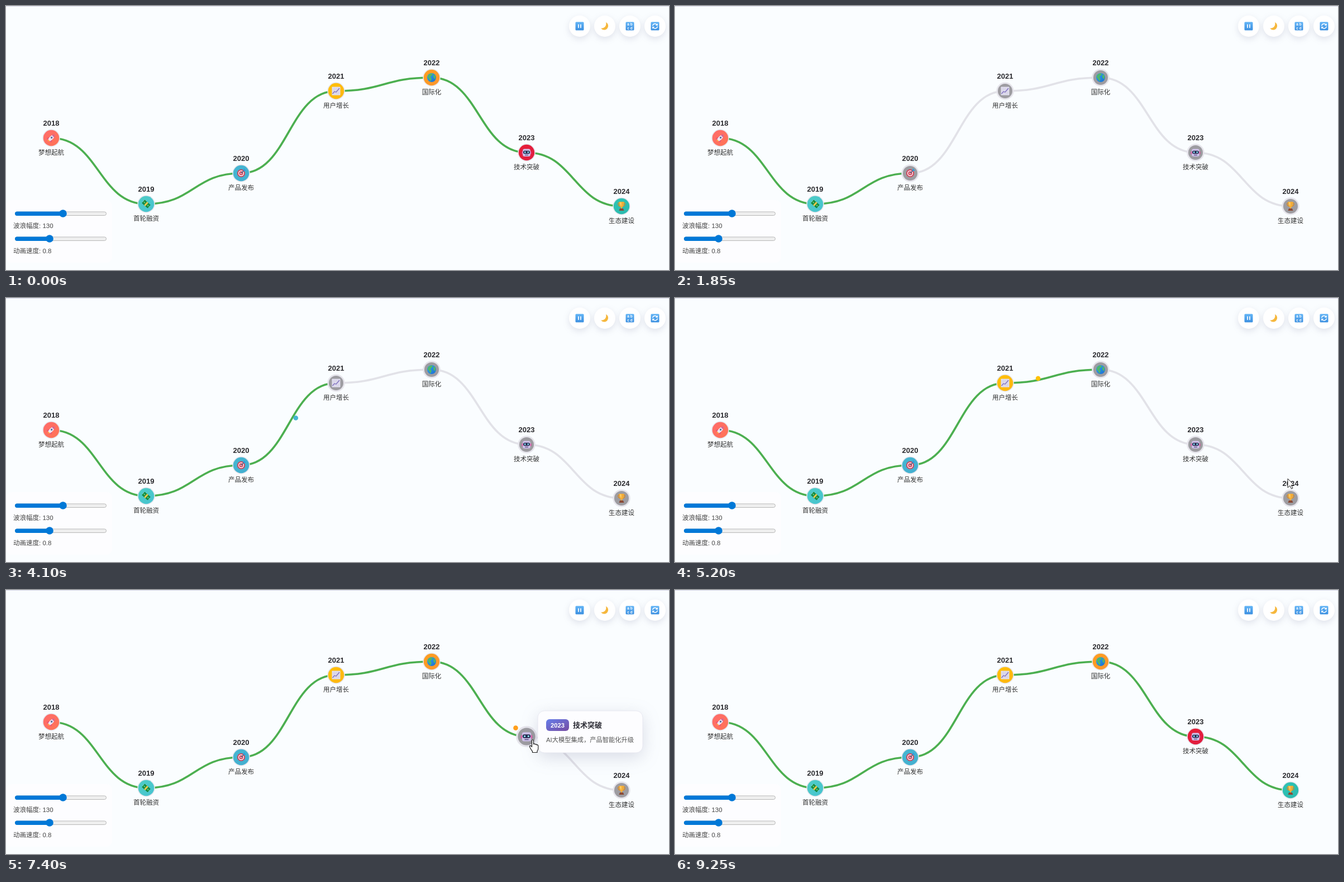
An HTML page for the animation above (9.8 s loop, 1187x472 px).

```html
<!DOCTYPE html>
<html lang="zh-CN">
<head>
<meta charset="utf-8">
<title>发展历程</title>
<style>
  html, body { margin: 0; width: 100%; height: 100%; overflow: hidden; background: #fafdff; }
  svg { display: block; width: 1187px; height: 472px;
    font-family: "Liberation Sans", "Noto Sans CJK SC", "Noto Sans CJK", sans-serif; }
  .year { font-size: 13px; font-weight: 700; fill: #2b2b2f; text-anchor: middle; }
  .name { font-size: 11.5px; font-weight: 500; fill: #333; text-anchor: middle; }
  .setting { font-size: 11.5px; font-weight: 500; fill: #444; }
  .title { font-size: 13px; font-weight: 700; fill: #2b2b33; }
  .detail { font-size: 11.25px; fill: #555; }
  .badge { font-size: 11.2px; font-weight: 700; fill: #fff; text-anchor: middle; }
  .button { filter: drop-shadow(0 4px 6px rgba(90, 90, 130, .16)); }
  .card { filter: drop-shadow(0 8px 15px rgba(90, 90, 130, .2)); }
  .glyph { font-size: 6.5px; font-weight: 700; fill: #fff; text-anchor: middle; }
</style>
</head>
<body>
<svg viewBox="0 0 1187 472">
  <defs>
    <linearGradient id="violet" x2="1" y2="1">
      <stop stop-color="#667eea"/><stop offset="1" stop-color="#764ba2"/>
    </linearGradient>
    <linearGradient id="key" x2="0" y2="1">
      <stop stop-color="#64b5f6"/><stop offset="1" stop-color="#3b8fe0"/>
    </linearGradient>
    <linearGradient id="sea" x2="1" y2="1">
      <stop stop-color="#2fa4ee"/><stop offset="1" stop-color="#1c6fd0"/>
    </linearGradient>

    <g id="rocket" transform="rotate(45) scale(.95)">
      <path d="M-3 1L-6 6L-2 6M3 1L6 6L2 6" fill="#e0527c"/>
      <path d="M0-9C4-6 4 1 2.5 6H-2.5C-4 1-4-6 0-9" fill="#eee6f2"/>
      <path d="M0-9C2-7.5 3-6 3.2-4.5H-3.2C-3-6-2-7.5 0-9" fill="#d8668f"/>
      <circle cy="-1" r="1.7" fill="#5a6c9c"/>
      <path d="M-1.5 6H1.5L0 9" fill="#ffc83d"/>
    </g>
    <g id="money">
      <path d="M-7-2C-6-7-1-8 1-5L-2 0M1 6C6 7 8 3 6 0L2 1" fill="#d6ead9"/>
      <g transform="rotate(42)">
        <rect x="-7" y="-4" width="14" height="8" rx="1" fill="#12883e"/>
        <rect x="-1.5" y="-4" width="3" height="8" fill="#f2c84b"/>
        <circle cx="-4.2" r="1.4" fill="#58c878"/><circle cx="4.2" r="1.4" fill="#58c878"/>
      </g>
    </g>
    <g id="dart">
      <circle r="7" fill="#d63e54"/><circle r="5.2" fill="#f1e9f0"/>
      <circle r="3.5" fill="#d63e54"/><circle r="1.5" fill="#f1e9f0"/>
      <path d="M0 0L5-5" stroke="#345a7d" stroke-width="1.3"/>
      <path d="M4-4V-7L6-9L6.5-6.5L9-6L7-4Z" fill="#2d9fdd"/>
    </g>
    <g id="chart">
      <rect x="-7.5" y="-7.5" width="15" height="15" rx="1" fill="#e2dff0"/>
      <path d="M-3.5-7V7M0-7V7M3.5-7V7M-7-3.5H7M-7 0H7M-7 3.5H7" stroke="#c9c6dc" stroke-width=".6"/>
      <path d="M-6.5 5L-3 1L0 2L6-5" fill="none" stroke="#7f6fc0" stroke-width="1.3"/>
    </g>
    <g id="globe">
      <circle r="8" fill="url(#sea)"/>
      <path d="M-6.5-4C-4-7-1-8 1-7.5L2-5L-1-3L-2 0L0 2L-2 7C-4 4-4 2-7 0ZM4-6L7-3L6.5 3L4 1L3-2Z" fill="#4fb86a"/>
    </g>
    <g id="robot">
      <rect x="-8.5" y="-2" width="3" height="5" rx="1" fill="#dc4f9c"/>
      <rect x="5.5" y="-2" width="3" height="5" rx="1" fill="#dc4f9c"/>
      <rect x="-6.8" y="-6.5" width="13.6" height="13.5" rx="3" fill="#cfc1ea"/>
      <rect x="-6" y="-3.2" width="12" height="5.4" rx="2.5" fill="#25284d"/>
      <circle cx="-2.8" cy="-.5" r="1.4" fill="#8fe7ff"/><circle cx="2.8" cy="-.5" r="1.4" fill="#8fe7ff"/>
      <rect x="-3" y="3.8" width="6" height="1.4" fill="#5c5389"/>
    </g>
    <g id="trophy">
      <path d="M-4-6C-8-6-6 0-2 0M4-6C8-6 6 0 2 0" fill="none" stroke="#d98a24" stroke-width="1.3"/>
      <path d="M-4.5-8H4.5C4.5-2 3 1 1 2V4H-1V2C-3 1-4.5-2-4.5-8" fill="#f5ad36"/>
      <path d="M-2.5-7H-.5V0C-2-2-2.5-4-2.5-7" fill="#ffd878"/>
      <path d="M-3 4H3L4.5 8H-4.5Z" fill="#8a4b38"/>
    </g>

    <path id="arrow" d="M0 0V16L4 12.5L6.5 18L9 17L6.5 11.5H11.5Z" fill="#fff" stroke="#222" stroke-linejoin="round"/>
    <path id="hand" d="M-1.5 1Q0-1.5 1.5 1V7.5Q3 6 4.3 8Q6 6.8 7 9Q9 8 9.8 10.5V15.5Q9.5 18.5 8 20V22.5H-.5V20.5Q-3 17.5-5.2 13Q-6.3 10.5-4 10.3Q-2.5 10.5-1.5 12.5Z" fill="#fff" stroke="#222" stroke-width="1.2" stroke-linejoin="round"/>
  </defs>

  <rect width="1187" height="472" fill="#fafdff"/>
  <rect width="1187" height="1" fill="#d6d8e8"/>
  <g id="lines" fill="none"></g>
  <circle id="particle" r="4.3"/>
  <g id="nodes"></g>
  <rect y="347" width="190" height="112" rx="10" fill="#fdfdff"/>
  <g id="settings"></g>
  <g id="buttons"></g>
  <g id="cards"></g>
  <g id="cursor"><use id="pointer"/></g>
</svg>
<script>
const LOOP = 9800, STEP = 50, RESET = 50, DONE = 9050;
const START = 421, SEGMENTS_PER_MS = 0.0007, FADE = 250;

const nodes = [
  [81, 236, '梦想起航', 'rocket', '#ff6b6b', '#ff7455'],
  [251, 354, '首轮融资', 'money', '#4ecdc4', '#46c3d2'],
  [421, 299, '产品发布', 'dart', '#45b7d1', '#43aed0'],
  [591, 152, '用户增长', 'chart', '#ffc107', '#fdb515'],
  [762, 128, '国际化', 'globe', '#ff9f1c', '#fb9630'],
  [932, 262, '技术突破', 'robot', '#e71d36', '#e01f42'],
  [1102, 358, '生态建设', 'trophy', '#2ec4b6', '#2cb9ad']
].map(([x, y, name, icon, color, end], i) => ({ x, y, name, icon, color, end, year: 2018 + i }));

const hovers = [
  { node: 4, x: 783, y: 93, w: 189, text: '服务拓展至全球15个国家和地区', from: 5700, to: 6980 },
  { node: 5, x: 952, y: 216, w: 188, text: 'AI大模型集成，产品智能化升级', from: 7130, to: 8080 }
];

// time, x, y
const route = [
  [5050, 1165, 455], [5200, 1097, 323], [5700, 765, 130], [6950, 765, 130],
  [7150, 943, 268], [8050, 943, 268], [8300, 1162, 318]
];

const $ = id => document.getElementById(id);
const clamp = v => Math.max(0, Math.min(1, v));
const mix = (a, b, k) => a + (b - a) * k;
const fill = (id, items, draw) => { $(id).innerHTML = items.map(draw).join(''); };

fill('lines', nodes.slice(1), (b, i) => {
  const a = nodes[i], mid = (a.x + b.x) / 2;
  return `<path d="M${a.x} ${a.y}C${mid} ${a.y} ${mid} ${b.y} ${b.x} ${b.y}"/>`;
});

fill('nodes', nodes, (n, i) => `<g transform="translate(${n.x} ${n.y})">
  <linearGradient id="tone${i}" x2="1" y2="1"><stop stop-color="${n.color}"/><stop offset="1" stop-color="${n.end}"/></linearGradient>
  <g class="labels"><text class="year" y="-22.5">${n.year}</text><text class="name" y="29.5">${n.name}</text></g>
  <g class="disc"><circle r="15.7" fill="#e6e5ec"/><circle class="face" r="13"/><use href="#${n.icon}"/></g>
</g>`);

fill('settings', [[371, 102, '波浪幅度: 130'], [416, 78, '动画速度: 0.8']], ([y, x, text]) => `
  <rect x="16.5" y="${y - 3}" width="163" height="6.5" rx="3.2" fill="#efefef" stroke="#b8b8b8"/>
  <rect x="16" y="${y - 3.5}" width="${x - 16}" height="7.5" rx="3.7" fill="#0078d7"/>
  <circle cx="${x}" cy="${y}" r="6.8" fill="#0078d7"/>
  <text class="setting" x="13" y="${y + 26}">${text}</text>`);

const key = '<rect x="-7.5" y="-7.5" width="15" height="15" rx="1.5" fill="url(#key)"/>';
const icons = [
  key + '<path d="M-2-3.3V3.3M2-3.3V3.3" stroke="#fff" stroke-width="1.7"/>',
  '<path d="M2-7A7.2 7.2 0 1 1-7 3.5C-1 5 4-1 2-7" fill="#f6b73c"/>',
  key + '<text class="glyph" y="-1.2">a b</text><text class="glyph" y="5.5">c d</text>',
  key + '<path d="M-4.3-.5A4.3 4.3 0 0 1 3.2-2.8M4.3.5A4.3 4.3 0 0 1-3.2 2.8" fill="none" stroke="#fff" stroke-width="1.5"/><path d="M4.8-5V-1H.8ZM-4.8 5V1H-.8Z" fill="#fff"/>'
];
fill('buttons', icons, (icon, i) => `<g transform="translate(${1027 + 45 * i} 36)">
  <circle class="button" r="19" fill="#fff"/>${icon}</g>`);

fill('cards', hovers, h => `<g transform="translate(${h.x} ${h.y})">
  <rect class="card" width="${h.w}" height="75" rx="12" fill="#fdfdff" stroke="#e4e4ee" stroke-width=".8"/>
  <rect x="15" y="15" width="41" height="21" rx="6" fill="url(#violet)"/>
  <text class="badge" x="35.5" y="29.5">${nodes[h.node].year}</text>
  <text class="title" x="63" y="29.5">${nodes[h.node].name}</text>
  <text class="detail" x="15" y="55.5">${h.text}</text></g>`);

const lines = [...$('lines').children], cards = [...$('cards').children];
const parts = [...$('nodes').children].map(g => ({
  labels: g.querySelector('.labels'), disc: g.querySelector('.disc'), face: g.querySelector('.face')
}));

function drawProgress(t) {
  const all = t < RESET || t >= DONE;
  const p = Math.max(0, Math.min(6, (t - START) * SEGMENTS_PER_MS));
  const seg = Math.min(5, Math.floor(p)), k = p - seg;
  lines.forEach((line, i) => {
    const on = all || i <= seg;
    line.setAttribute('stroke', on ? '#4caf50' : '#e2e2e8');
    line.setAttribute('stroke-width', 3.6);
  });
  parts.forEach(({ face }, i) => {
    const on = all || i <= seg;
    face.setAttribute('fill', on ? `url(#tone${i})` : '#9d9ca1');
    face.setAttribute('r', on ? 14.2 : 13);
  });
  const a = nodes[seg], b = nodes[seg + 1], dot = $('particle');
  dot.setAttribute('cx', mix(a.x, b.x, k));
  dot.setAttribute('cy', mix(a.y, b.y, k));
  dot.setAttribute('fill', a.color);
  dot.style.visibility = all ? 'hidden' : 'visible';
}

function drawHover(t) {
  hovers.forEach((h, i) => {
    const k = clamp((t - h.from) / FADE) * clamp(1 - (t - h.to) / FADE);
    const { labels, disc } = parts[h.node];
    cards[i].style.opacity = k;
    labels.style.opacity = 1 - k;
    disc.setAttribute('transform', `scale(${1 + 0.2 * k})`);
  });
}

function drawCursor(t) {
  const i = route.findIndex(([time]) => time > t);
  $('cursor').style.visibility = i > 0 ? 'visible' : 'hidden';
  if (i < 1) return;
  const [t0, x0, y0] = route[i - 1], [t1, x1, y1] = route[i];
  const k = (t - t0) / (t1 - t0);
  const over = hovers.some(h => t >= h.from && t < h.to);
  $('pointer').setAttribute('href', over ? '#hand' : '#arrow');
  $('cursor').setAttribute('transform', `translate(${mix(x0, x1, k)} ${mix(y0, y1, k)})`);
}

const begin = performance.now();
function frame() {
  const t = Math.floor((performance.now() - begin) % LOOP / STEP) * STEP;
  drawProgress(t);
  drawHover(t);
  drawCursor(t);
  requestAnimationFrame(frame);
}
frame();
</script>
</body>
</html>
```
